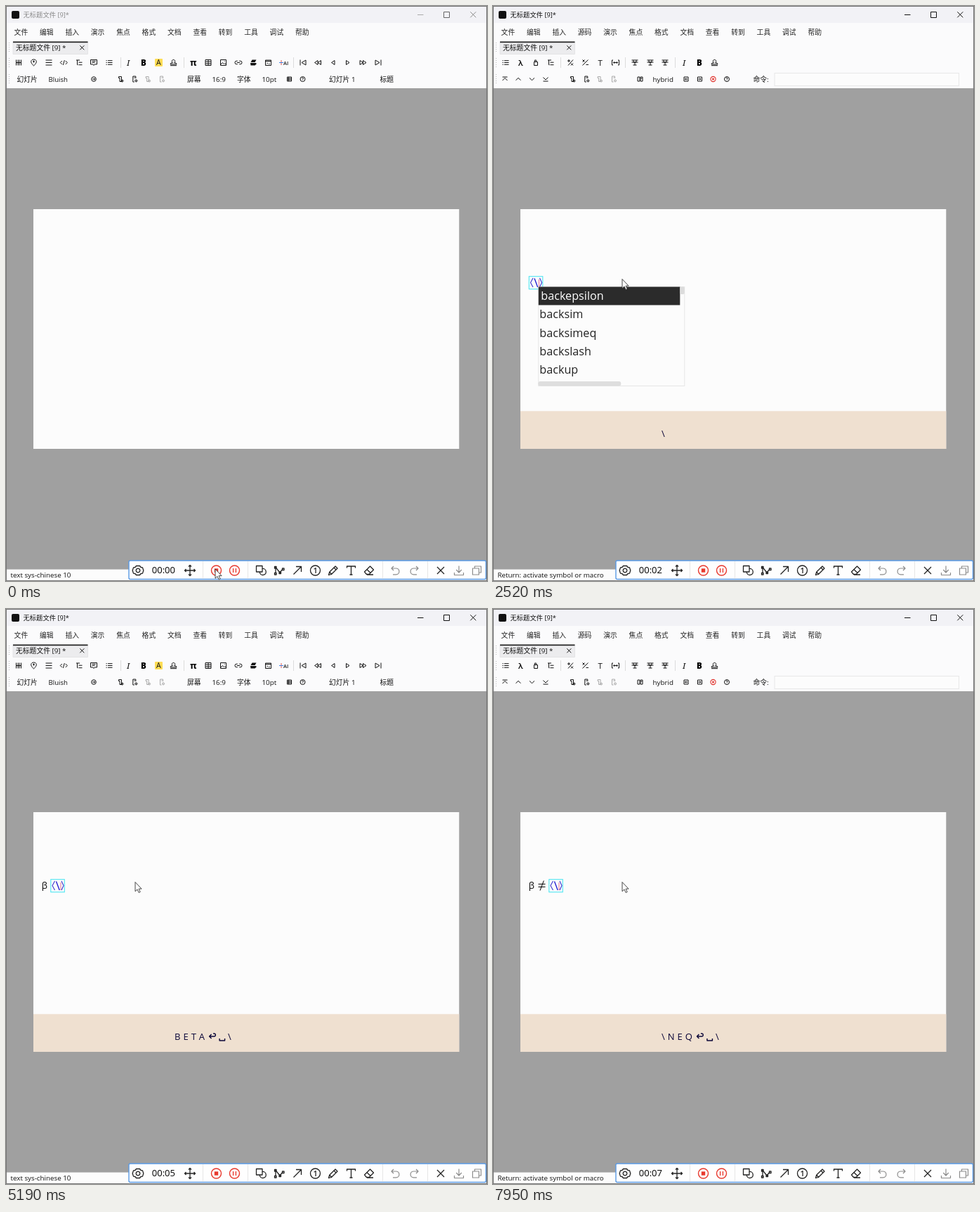
These frames come from a looping animation (685 px wide and 818 px high, 8000 ms). An HTML page:

```html
<!DOCTYPE html>
<html lang="zh">
<head>
<meta charset="utf-8">
<title>Formula input</title>
<style>
  html, body { margin: 0; width: 100%; height: 100%; overflow: hidden; background: #a0a0a0; }
  svg { display: block; width: 100%; height: 100%; }
  text { font-family: "Open Sans", "Noto Sans CJK SC", "Noto Sans CJK", "Noto Sans", sans-serif; white-space: pre; }
  .ico { fill: none; stroke-linejoin: round; }
</style>
</head>
<body>
<svg id="stage" viewBox="0 0 685 818" xmlns="http://www.w3.org/2000/svg"></svg>
<script>
const LOOP = 8000;
const stage = document.getElementById('stage');
const pen = document.createElement('canvas').getContext('2d');
pen.font = '13px "Open Sans", "Noto Sans", sans-serif';
const measure = s => pen.measureText(s).width;

const text = (x, y, s, size = 9.8, fill = '#111', extra = '') =>
  `<text x="${x}" y="${y}" font-size="${size}" fill="${fill}" ${extra}>${s}</text>`;
const rect = (x, y, w, h, fill, extra = '') =>
  `<rect x="${x}" y="${y}" width="${w}" height="${h}" fill="${fill}" ${extra}/>`;
const line = (d, color = '#111', width = 1, extra = '') =>
  `<path class="ico" d="${d}" stroke="${color}" stroke-width="${width}" ${extra}/>`;
const at = (x, y, s) => `<g transform="translate(${x} ${y})">${s}</g>`;
const circle = r => `M${-r} 0a${r} ${r} 0 1 0 ${2 * r} 0a${r} ${r} 0 1 0 ${-2 * r} 0`;

const ICONS = {
  columns: 'M-3.5-4v8M-1-4v8M1-4v8M3.5-4v8M-3.5 0h7',
  pin: 'M0 4.5C-6-.5-4-4.5 0-4.5S6-.5 0 4.5zM-1.5-1.5h3M0-3v3',
  lines: 'M-4.5-3.5h9M-4.5 0h9M-4.5 3.5h9',
  code: 'M-2.5-2.5l-2.5 2.5 2.5 2.5M2.5-2.5l2.5 2.5-2.5 2.5M1-3.5l-2 7',
  tree: 'M-4-3.5h5M-.5-.3h5M-.5 3.2h5M-2.5-3.5v6.7h1',
  comment: 'M-4.5-4h9v6.5H1.2L0 4-1.2 2.5h-3.3zM-2.5-2h5M-2.5 0h4',
  items: 'M-4.5-2.8h1.3M-2-2.8h6.5M-4.5 0h1.3M-2 0h6.5M-4.5 2.8h1.3M-2 2.8h6.5',
  stamp: 'M-1 .5C-3-1.5-2.5-4 0-4s3 2.5 1 4.5h2.5l1 2h-9l1-2zM-4.5 4.2h9',
  table: 'M-4-4h8v8h-8zM-4-1.3h8M-4 1.5h8M0-4v8',
  image: 'M-4-4h8v8h-8zM-4 3l3-3 2 2 1-1 2 2M1.2-2h.8',
  link: 'M-1.2-2.3h-1.5a2.3 2.3 0 0 0 0 4.6h1.5M1.2-2.3h1.5a2.3 2.3 0 0 1 0 4.6H1.2M-2 0h4',
  terminal: 'M-4-3.5h8v7.5h-8zM-4-2h8M-2 0l1.2 1L-2 2M.5 2h1.5',
  first: 'M-4-4v8M4-3.5L-2 0l6 3.5z',
  rewind: 'M0-3L-4.5 0 0 3zM4.5-3L0 0l4.5 3z',
  prev: 'M2.5-3L-2 0l4.5 3z',
  next: 'M-2.5-3L2 0l-4.5 3z',
  forward: 'M0-3L4.5 0 0 3zM-4.5-3L0 0l-4.5 3z',
  last: 'M4-4v8M-4-3.5L2 0l-6 3.5z',
  plus: circle(3.3) + 'M-1.8 0h3.6M.4-1.4L1.8 0 .4 1.4',
  noteA: 'M-3.5-3.5h4v7h-2.5v-5h-1.5zM1.5 1a1.5 1.5 0 1 0 .1 0M1.5 1.5v2',
  noteB: 'M-2.5-4h4v3M-2.5-4v8h2M-1-2h1.5M2 .7a1.6 1.6 0 1 0 .1 0M2 1.5v1.8',
  panel: 'M-3-3h6v6h-6zM-3-1h6M-3 1h6M-1-3v6',
  help: circle(3.5) + 'M-1-1c0-1.4 2-1.4 2 0S0 0 0 .8M0 1.6v.5',
  bucket: 'M-2.5-1h5v5h-5zM-1.5-1v-2.5h2V-1',
  sign: 'M-4-2.5h4M-2-4.5v4M4-4l-7 8M1 1l3 3M4 1L1 4',
  cross: 'M-4-4l3 3M-1-4l-3 3M4-4l-8 8M1 3h3.5',
  span: 'M-3.5-3.5H-5v7h1.5M3.5-3.5H5v7H3.5M-3 0h6M-1.7-1.3L-3 0l1.3 1.3M1.7-1.3L3 0 1.7 1.3',
  spread: 'M-4.5-3.5h9M-4.5-.5h9M-2-3.5v3h4v-3M-2.5 3.5h5M0-.5v4',
  top: 'M-3.5-3h7M-3.5 2L0-1.5 3.5 2',
  up: 'M-3.5 1.7L0-1.7l3.5 3.4',
  down: 'M-3.5-1.7L0 1.7l3.5-3.4',
  bottom: 'M-3.5-2.5L0 1l3.5-3.5M-3.5 3h7',
  card: 'M-3.5-3h3v6h-3zM.5-3h3v6h-3zM1-1l2 0',
  left: 'M-3-3h6v6h-6zM2 0h-3.5M0-1.5L-1.5 0 0 1.5',
  right: 'M-3-3h6v6h-6zM-2 0h3.5M0-1.5L1.5 0 0 1.5',
  stop: circle(3.6) + 'M-1.3-1.3l2.6 2.6M1.3-1.3l-2.6 2.6',
  gear: 'M-2.5-6.5h5l1.6 2 2.4.4 1.3 4.1-1.3 4.1-2.4.4-1.6 2h-5l-1.6-2-2.4-.4L-7.8 0l1.3-4.1 2.4-.4z' + circle(2.8),
  move: 'M-7.5 0h15M0-7.5v15M-2-5.5l2-2 2 2M-2 5.5l2 2 2-2M-5.5-2l-2 2 2 2M5.5-2l2 2-2 2',
  shapes: 'M-6.5-6.5h8.5v8.5h-8.5zM2.3-2.5a4.5 4.5 0 1 1-4 5',
  poly: 'M-5-5v9.5M-5-4.5L1 3l4-5M-6.5-5.5h2.5v2.5h-2.5zM-6.5 3.5h2.5V6h-2.5zM0 2h2.5v2.5H0zM4.5-3H7v2.5H4.5z',
  arrow: 'M-5.5 5.5l11-11M-2-5.5h7.5V2',
  pencil: 'M-6.5 6.5l1.2-4.2 8.3-8.3 3 3-8.3 8.3zM1-4l3 3M-5.3 2.3l3 3',
  letter: 'M-6-3.5V-6H6v2.5M0-6V6M-2 6h4',
  eraser: 'M-6.5 2l8-8 5 5-6.5 6.5h-3.5zM-3-1.5l5 5M-3 6H6',
  undo: 'M-3-6l-3 3 3 3M-6-3h6.5a4.3 4.3 0 0 1 0 8.8H-4',
  redo: 'M3-6l3 3-3 3M6-3H-.5a4.3 4.3 0 0 0 0 8.8H4',
  close: 'M-5-5L5 5M5-5L-5 5',
  save: 'M0-6.5V3M-3.8-1L0 3l3.8-4M-6.5 3v3.5h13V3',
  copy: 'M-6-3h9v9h-9zM-3-3v-3h9v9H3'
};
const icon = (name, x, y, color, width) => at(x, y, line(ICONS[name], color, width));
const row = (y, list, color, width) =>
  list.map(([name, x]) => icon(name, x, y, color, width)).join('');
const separators = (y, h, xs, color = '#dcdcdc') =>
  xs.map(x => rect(x, y, 1, h, color)).join('');
const menu = names => names.split(' ').map((s, i) => text(11.6 + i * 36.4, 40.5, s, 9.8, '#222')).join('');

const italic = x => text(x - 2, 84.5, 'I', 11.5, '#111', 'font-style="italic" style="font-family:\'Noto Serif\',serif"');
const bold = x => text(x - 4, 84.5, 'B', 11.5, '#000', 'font-weight="800"');
const notes = x => row(104, [['noteA', x], ['noteB', x + 19.3]]) +
  row(104, [['noteA', x + 38.6], ['noteB', x + 58]], '#aaa');

const textBars = menu('文件 编辑 插入 演示 焦点 格式 文档 查看 转到 工具 调试 帮助') +
  row(80.5, [['columns', 18], ['pin', 39.5], ['lines', 61], ['code', 82.3], ['tree', 104], ['comment', 125],
    ['items', 147], ['stamp', 238.5], ['table', 288], ['image', 309.5], ['link', 331], ['terminal', 373.5],
    ['first', 423], ['rewind', 444], ['prev', 465.5], ['next', 487], ['forward', 508.5], ['last', 530]]) +
  separators(73, 15, [163, 253, 409]) + italic(174) + bold(196) +
  rect(212, 75, 11, 11, '#ffdd55', 'rx="1"') + text(214, 84.3, 'A', 10.5) +
  text(262, 84.5, 'π', 13, '#000', 'font-weight="700"') +
  at(352.5, 80.5, '<path d="M-2-4h6L2-.5h-6zM-4.5.5H3l1.5 1L2 4h-6z" fill="#111"/>') +
  at(392, 80.5, line('M0-3.5v7', '#e2574c') + line('M-3 0h6', '#3b82e8')) +
  text(395, 83.5, 'AI', 7.5, '#222', 'font-weight="600"') +
  text(15.5, 108, '幻灯片') + text(60.5, 108, 'Bluish', 9.6) + notes(164) +
  row(104, [['plus', 125], ['panel', 403.5], ['help', 422.5]]) +
  text(258, 108, '屏幕') + text(293.5, 108, '16:9') + text(329, 108, '字体') +
  text(364.5, 108, '10pt') + text(460, 108, '幻灯片 1') + text(532.5, 108, '标题');

const mathBars = menu('文件 编辑 插入 源码 演示 焦点 格式 文档 查看 转到 工具 调试 帮助') +
  row(80.5, [['items', 18], ['bucket', 61], ['tree', 82], ['sign', 110], ['cross', 131.5], ['span', 174.5],
    ['spread', 202], ['spread', 224], ['spread', 245], ['stamp', 315.5]]) +
  separators(73, 15, [96, 188, 259]) + italic(272) + bold(294) +
  text(36, 84.5, 'λ', 11.5, '#000', 'font-weight="600"') + text(149.5, 84.5, 'T', 11.5) +
  row(104, [['top', 17], ['up', 36], ['down', 55.5], ['bottom', 75], ['card', 209.5], ['left', 275],
    ['right', 294.5], ['help', 333]]) +
  icon('stop', 313.5, 104, '#e0302a', 1.1) + notes(114) +
  text(227.5, 108, 'hybrid') + text(370.5, 108, '命令:') +
  rect(401, 95.5, 262.5, 18, '#fcfcfc', 'stroke="#e8e8e8"');

const grips = [52, 74, 97].map(y => line(`M4.5 ${y}v15`, '#b8b8b8', 1, 'stroke-dasharray="1 2"')).join('');
const frame = rect(0, 0, 685, 818, '#a0a0a0') + rect(0, 0, 685, 24, '#f2f2f6') +
  rect(0, 24, 685, 93, '#fbfbfc') + rect(8, 7, 11, 11, '#111', 'rx="2"') + grips +
  rect(10, 51, 106.5, 17.5, '#ececee', 'stroke="#dedee0" stroke-width=".7"') +
  rect(10, 50.5, 106.5, 1.7, '#222') + text(14, 62.5, '无标题文件 [9] *') +
  at(108.3, 59.3, line('M-3-3l6 6M3-3l-6 6')) +
  rect(39, 289, 606.3, 341, '#fcfcfc') + rect(0, 801.5, 685, 16, '#fcfcfc');

const timerBar = rect(175, 789, 508.5, 26.5, '#fefefe', 'rx="2" stroke="#5a9be6" stroke-width="1.4"') +
  separators(790, 25, [280, 344, 536, 600], '#e6e6e6') +
  row(803, [['gear', 188], ['move', 262], ['shapes', 363], ['poly', 389], ['arrow', 415], ['pencil', 466],
    ['letter', 491.5], ['eraser', 517], ['close', 619]], '#222', 1.3) +
  row(803, [['undo', 555], ['redo', 581], ['save', 645], ['copy', 670.5]], '#8c8c8c', 1.2) +
  at(299.5, 803, line(circle(7), '#e8392e', 1.4) + rect(-2.7, -2.7, 5.4, 5.4, '#e8392e')) +
  at(325.5, 803, line(circle(7), '#e8392e', 1.4) + line('M-1.9-3v6M1.9-3v6', '#e8392e', 1.4)) +
  at(440.5, 803, line(circle(7), '#222', 1.3) + text(-3, 4, '1', 11, '#222', 'font-weight="600"'));

const BACK = ['backepsilon', 'backsim', 'backsimeq', 'backslash', 'backup'];
const NOT = ['nLeftarrow', 'nLeftrightarrow', 'nRightarrow', 'nVDash', 'nVdash'];
const BE = ['because', 'begin', 'beta', 'beth', 'between'];
const NE = ['ne', 'nearrow', 'neg', 'neq', 'nexists'];

// Each entry changes part of the picture from its time on.
const steps = [
  [0, { active: false, math: false, clock: 0, keys: '', before: '', caret: 0, box: 0, typed: '',
        list: null, thumb: 118, command: '', status: 'text sys-chinese 10' }],
  [500, { active: true }],
  [550, { caret: 51.5 }],
  [1060, { clock: 1 }],
  [1720, { keys: '\\', box: 51, caret: 0 }],
  [2050, { clock: 2 }],
  [2140, { math: true, status: 'Return: activate symbol or macro' }],
  [2520, { list: BACK }],
  [2700, { keys: '\\B', typed: 'b' }],
  [2810, { keys: '\\BE', typed: 'be', list: BE }],
  [2920, { keys: '\\BET', typed: 'bet', list: BE.slice(2) }],
  [3030, { keys: '\\BETA', typed: 'beta', list: BE.slice(2, 3), clock: 3 }],
  [3310, { keys: '\\BETA↩', typed: '', list: null, box: 0, before: 'β', caret: 59 }],
  [3400, { command: 'beta', status: 'Return: insert#β' }],
  [3740, { math: false, command: '', status: 'text sys-chinese 10' }],
  [4060, { clock: 4 }],
  [4250, { keys: '\\BETA↩␣', caret: 64 }],
  [5050, { clock: 5 }],
  [5190, { keys: 'BETA↩␣\\', box: 63.5, caret: 0 }],
  [5610, { math: true, status: 'Return: activate symbol or macro' }],
  [5890, { list: NOT, thumb: 159 }],
  [6030, { keys: 'ETA↩␣\\N', typed: 'n' }],
  [6125, { keys: 'TA↩␣\\NE', typed: 'ne', list: NE, clock: 6 }],
  [6220, { keys: 'A↩␣\\NEQ', typed: 'neq', list: NE.slice(3, 4) }],
  [6540, { keys: '↩␣\\NEQ↩', typed: '', list: null, box: 0, before: 'β≠', caret: 75.5,
           math: false, status: 'text sys-chinese 10' }],
  [7010, { clock: 7 }],
  [7200, { keys: '␣\\NEQ↩␣', caret: 80 }],
  [7530, { keys: '\\NEQ↩␣\\', box: 79.5, caret: 0 }],
  [7950, { math: true, status: 'Return: activate symbol or macro' }]
];

const path = [[298, 801], [303, 752], [307, 695], [298, 630], [275, 563], [250, 492], [236, 468], [210, 433], [184, 388.5]];

function keyStrip(keys) {
  if (!keys) return '';
  let x = 240, out = rect(39, 576.3, 606.3, 53.7, '#efe0d0');
  for (const key of keys) {
    if (key === '↩') {
      out += at(x + 2, 608, line('M3.5-3L.5 0l3 3M.5 0h6.8a2 2 0 0 0 0-4H6', '#0b0638', 1.4));
      x += 15;
    } else if (key === '␣') {
      out += at(x + 1.5, 612, line('M.5-1v3h7.5v-3', '#0b0638', 1.4));
      x += 14;
    } else {
      out += text(x, 612.5, key, 13, '#0b0638');
      x += measure(key) + 4;
    }
  }
  return out;
}

function inputBox(x, typed) {
  if (!x) return '';
  const w = measure(typed);
  return rect(x + .3, 384.7, 19.5 + w, 18, '#fcfcfc', 'stroke="#4fe6f2" stroke-width="1.1"') +
    line(`M${x + 6} 387l-3.5 6.5 3.5 6.5M${x + 15.5 + w} 387l3 6.5-3 6.5`, '#3a35cf', 1.1) +
    line(`M${x + 8} 387.5l4.7 12.5`, '#1713d0', 1.3) + text(x + 13, 398, typed, 13, '#1713d0') +
    line(`M${x + 14.5 + w} 389v11`, '#e0507c', .8);
}

function popup(x, list, thumb) {
  if (!list) return '';
  return rect(x + .5, 399.5, 208, 141, '#fcfcfc', 'stroke="#e6e6e6"') +
    rect(x + .5, 399.5, 201.5, 26, '#2b2b2b') + rect(x + 202, 399.5, 6.5, 10.5, '#dcdcdc', 'rx="2"') +
    rect(x, 534, thumb, 6.5, '#dedede', 'rx="3"') +
    list.map((s, i) => text(x + (i ? 2 : 4), 418 + i * 26.3, s, 16.2, i ? '#222' : '#fff')).join('');
}

function scene(s) {
  const tint = s.active ? '#111' : '#8a8a8a';
  return frame + text(24.5, 16, '无标题文件 [9]*', 9.3, tint) +
    line('M586 12.5h8.5', s.active ? '#111' : '#aaa') +
    line('M623.5 8.5h8v8h-8z', s.active ? '#111' : '#666') +
    at(665.3, 12.3, line('M-4-4l8 8M4-4l-8 8', tint)) +
    (s.math ? mathBars : textBars) + text(404.5, 107.8, s.command) + text(6.5, 813, s.status) +
    keyStrip(s.keys) + (s.before ? text(50.7, 397.5, 'β', 13, '#000') : '') +
    (s.before === 'β≠' ? line('M64.5 391.3h10M64.5 395.3h10M72.3 386.5l-5.3 14', '#000') : '') +
    (s.caret ? line(`M${s.caret} ${s.before ? 385.5 : 386}V${s.before ? 402 : 399}`, '#f04040') : '') +
    inputBox(s.box, s.typed) + popup(s.box + 13.3, s.list, s.thumb) + timerBar +
    text(207.8, 807, '00:0' + s.clock, 13, '#000') +
    rect(.5, .5, 684, 817, 'none', 'stroke="#777"');
}

stage.innerHTML = `<g id="scene"></g><g id="cursor">
  <path d="M0 0v13.2l3-2.8 2.2 4.6 2-1-2.1-4.4h4z" fill="#fff" stroke="#333" stroke-width=".9" stroke-linejoin="round"/></g>`;
const sceneGroup = document.getElementById('scene');
const cursor = document.getElementById('cursor');
let start, shown = -1;

function draw(now) {
  start ??= now;
  const t = (now - start) % LOOP;
  const count = steps.filter(([time]) => time <= t).length;
  if (count !== shown) {
    sceneGroup.innerHTML = scene(Object.assign({}, ...steps.slice(0, count).map(step => step[1])));
    shown = count;
  }
  const hop = t < 30 ? 0 : Math.min(8, 1 + Math.floor((t - 30) / 47));
  cursor.setAttribute('transform', `translate(${path[hop]})`);
  requestAnimationFrame(draw);
}
requestAnimationFrame(draw);
</script>
</body>
</html>
```
